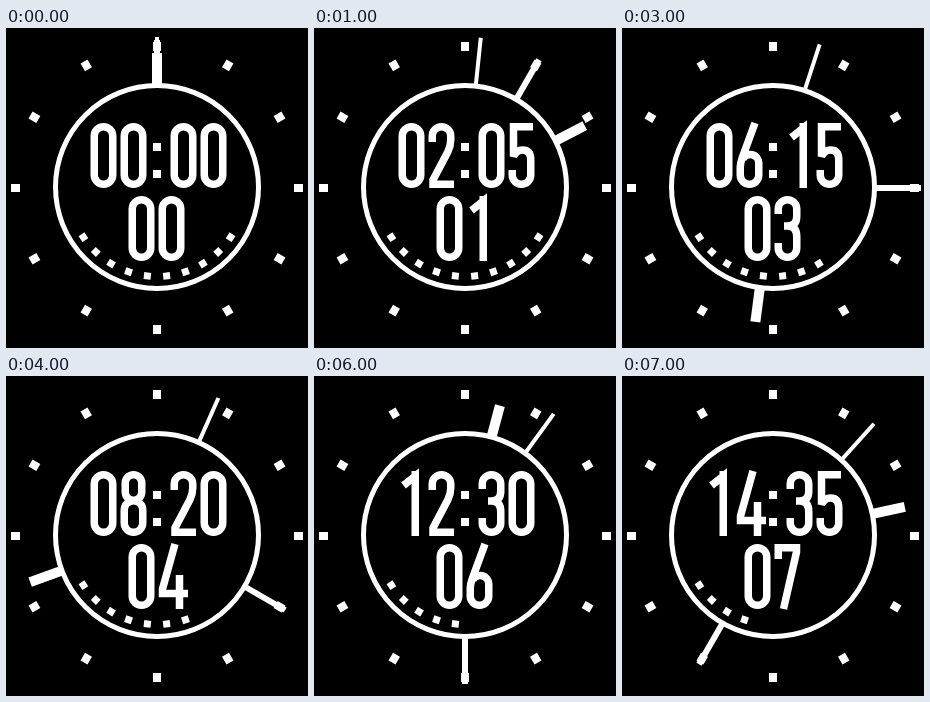
An HTML page for the animation above (8 s loop, 302 px wide and 320 px high).

```html
<!DOCTYPE html>
<html lang="en">
<head>
<meta charset="utf-8">
<title>Watch face</title>
<style>
  html, body { margin: 0; width: 100%; height: 100%; overflow: hidden; background: #000; }
  svg { display: block; width: 302px; height: 320px; }
  .line { fill: none; stroke: #fff; }
  .digit { fill: none; stroke: #fff; stroke-width: 7.5; }
</style>
</head>
<body>
<svg id="face" viewBox="0 0 302 320" role="img" aria-label="Watch face">
  <rect width="302" height="320"/>
  <g id="marks" fill="#fff"></g>
  <g id="hands" class="line"></g>
  <circle class="line" cx="151" cy="159" r="101.5" stroke-width="5"/>
  <g id="cells" fill="#fff"></g>
  <g fill="#fff">
    <rect x="147" y="115" width="8" height="8"/>
    <rect x="147" y="142" width="8" height="8"/>
  </g>
  <g id="digits"></g>
</svg>
<script>
const CX = 151, CY = 160, STEP = 1000, STEPS = 8;
const $ = id => document.getElementById(id);

function add(parent, tag, attrs) {
  const el = document.createElementNS('http://www.w3.org/2000/svg', tag);
  for (const key in attrs) el.setAttribute(key, attrs[key]);
  return parent.appendChild(el);
}

const turn = deg => `translate(${CX} ${CY}) rotate(${deg})`;

// A block centred on the given radius, pointing outwards
const block = (parent, deg, radius, w, h) => add(parent, 'rect', {
  x: -w / 2, y: -radius - h / 2, width: w, height: h, transform: turn(deg)
});

// Digit centrelines in a 26 x 65 cell
const GLYPHS = [
  'M3.75 13a9.25 9.25 0 0 1 18.5 0V52a9.25 9.25 0 0 1-18.5 0Z',
  'M5 14.5L16.75 5V65M16.75 0V8',
  'M3.75 19V13a9.25 9.25 0 0 1 18.5 0v4q0 6-3 12L4.5 57V61.25H25.5',
  'M3.75 18V13a9.25 9.25 0 0 1 18.5 0v7q0 10-9 10H9.5h3.75q9 0 9 11V52a9.25 9.25 0 0 1-18.5 0V47',
  'M16.5 0L4 45V49.5H29.5M21 31V65',
  'M24.5 3.75H5V33.5q3-6.5 9-6.5 8.25 0 8.25 10V52a9.25 9.25 0 0 1-18.5 0V47',
  'M18.5 0L6 34Q3.75 40 3.75 44V52a9.25 9.25 0 0 0 18.5 0V40a8.5 8.5 0 0 0-16-4',
  'M3.75 15V3.75H22V8L9 65',
  'M4.75 12a8.25 8.25 0 0 1 16.5 0V21a8.25 8.25 0 0 1-16.5 0ZM3.75 39a9.25 9.25 0 0 1 18.5 0V52a9.25 9.25 0 0 1-18.5 0Z'
];

for (let i = 0; i < 12; i++) block($('marks'), i * 30, 141.5, 8, 9);

const cells = Array.from({ length: 10 }, (_, i) =>
  block($('cells'), 236.25 - i * 12.5, 88.5, 7, 7));

// Degrees per step, length and width of the hour, minute and second hands
const hands = [[62.5, 135, 10], [30, 148, 6], [6, 151, 4]].map(([rate, len, width]) => ({
  rate, el: add($('hands'), 'path', { d: `M0 -102V${-len}`, 'stroke-width': width })
}));

const digits = [[84.5, 95], [114.5, 95], [164.5, 95], [194.5, 95], [122.5, 168], [152.5, 168]]
  .map(([x, y]) => add($('digits'), 'path', { class: 'digit', transform: `translate(${x} ${y})` }));

const two = n => String(n).padStart(2, '0');

function show(k) {
  const time = [two(k * 2), two(k * 5), two(k)];
  [...time.join('')].forEach((c, i) => digits[i].setAttribute('d', GLYPHS[c]));
  $('face').setAttribute('aria-label', time.join(':'));
  hands.forEach(({ el, rate }) => el.setAttribute('transform', turn(rate * k)));
  cells.forEach((el, i) => el.setAttribute('visibility', i < 11 - k ? 'visible' : 'hidden'));
}

let shown = -1;
function tick() {
  const k = Math.floor(performance.now() / STEP) % STEPS;
  if (k !== shown) show(shown = k);
  requestAnimationFrame(tick);
}
tick();
</script>
</body>
</html>
```
